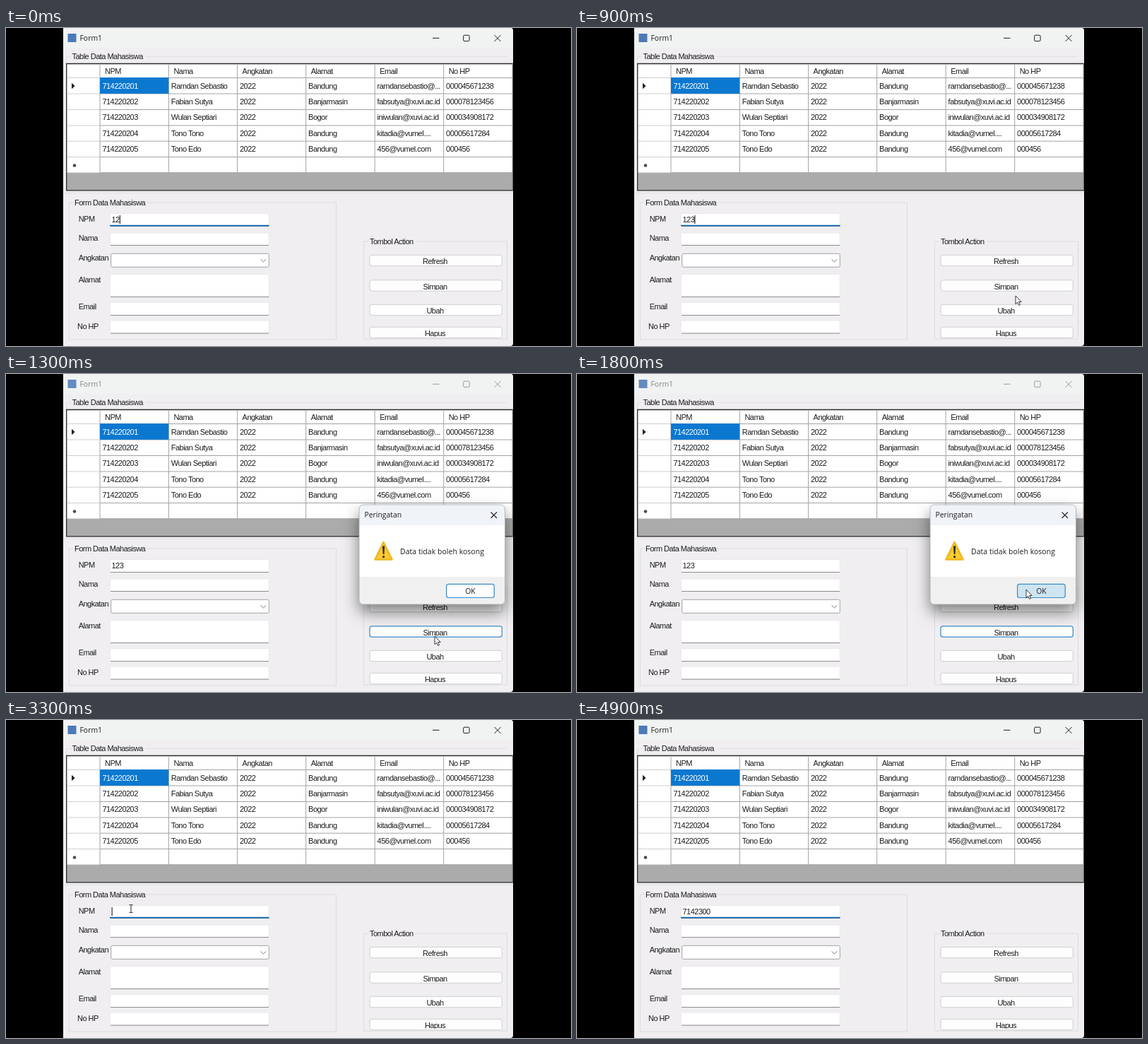
An HTML page that plays this animation: 800 px wide and 450 px high, repeating every 5000 ms.

```html
<!DOCTYPE html>
<html lang="id">
<head>
<meta charset="utf-8">
<title>Form1</title>
<style>
  html, body { margin: 0; width: 100%; height: 100%; overflow: hidden; background: #000; }
  svg { display: block; width: 100%; height: 100%; }
  text { font: 11px "Liberation Sans", Arial, sans-serif; letter-spacing: -.52px; fill: #1c1c1c; white-space: pre; }
  .ui { font: 10.4px "Open Sans", "Noto Sans", sans-serif; letter-spacing: 0; }
  .message { font-weight: 500; letter-spacing: .08px; }
  .mid { text-anchor: middle; }
</style>
</head>
<body>
<svg id="stage" viewBox="0 0 800 450">
  <defs>
    <filter id="shadow" x="-30%" y="-30%" width="160%" height="180%">
      <feDropShadow dx="0" dy="11" stdDeviation="11" flood-opacity=".5"/>
    </filter>
    <clipPath id="dialogClip"><rect x="500" y="185" width="206.5" height="141" rx="6"/></clipPath>
    <clipPath id="windowClip"><rect x="81" y="0" width="637" height="450" rx="4"/></clipPath>
  </defs>
</svg>
<script>
const LOOP = 5000;
const BLINK = 530;
const DIGIT = 5.6;
const ACCENT = '#3a8cc8';
const stage = document.getElementById('stage');

function add(tag, attrs, parent = stage) {
  const el = document.createElementNS('http://www.w3.org/2000/svg', tag);
  for (const key in attrs) el.setAttribute(key, attrs[key]);
  parent.appendChild(el);
  return el;
}
const rect = (x, y, width, height, fill, more, parent) =>
  add('rect', { x, y, width, height, fill, ...more }, parent);
const line = (d, stroke, width = 1, parent) =>
  add('path', { d, stroke, 'stroke-width': width, fill: 'none' }, parent);
function label(x, y, content, more, parent) {
  const el = add('text', { x, y, ...more }, parent);
  el.textContent = content;
  return el;
}
const show = (el, on) => el.setAttribute('visibility', on ? 'visible' : 'hidden');

// Window and title bar
add('path', { d: 'M81 0H714Q718 0 718 4V446Q718 450 714 450H81Z', fill: '#f0eef1' });
add('path', { d: 'M81 0H714Q718 0 718 4V28H81Z', fill: '#f0f3f2' });
const icon = rect(87.5, 8, 12, 12, '#4d79b8');
const title = label(104.5, 17.8, 'Form1', { class: 'ui' });
const controls = add('g', { fill: 'none' });
add('path', { d: 'M604 14.3H613.5M691.5 10L700.5 19M700.5 10L691.5 19' }, controls);
rect(647.7, 10.2, 8.4, 8.4, 'none', { rx: 1.4 }, controls);

// Data table
line('M92 40.5H85.5V50M198 40.5H709.5M82 233.5H718', '#e1e0e4');
label(93.5, 44.3, 'Table Data Mahasiswa');
rect(85, 50, 633, 180, '#ababab');
rect(86, 51, 631.5, 154, '#fff');
const colX = [133, 230.4, 327.6, 424.7, 522.2, 619.7, 717.2];
const rowY = [70.5, 93, 115.5, 138, 160.2, 182.5, 204.7];
colX.forEach(x => line(`M${x} 52V205`, '#a3a3a3'));
rowY.forEach(y => {
  line(`M87 ${y}H133`, '#cfcfcf');
  line(`M133 ${y}H717`, '#a3a3a3');
});
rect(133, 70, 97.2, 22.9, '#0b78d0');
line('M718 50.5H85.7V229.8H718', '#2b2b2b', 1.3);
line('M717.4 50V230', '#6c6c6c');
['NPM', 'Nama', 'Angkatan', 'Alamat', 'Email', 'No HP'].forEach((name, i) =>
  label(colX[i] + 7, 64.8, name));
const rows = [
  ['714220201', 'Ramdan Sebastio', '2022', 'Bandung', 'ramdansebastio@...', '000045671238'],
  ['714220202', 'Fabian Sutya', '2022', 'Banjarmasin', 'fabsutya@xuvi.ac.id', '000078123456'],
  ['714220203', 'Wulan Septiari', '2022', 'Bogor', 'iniwulan@xuvi.ac.id', '000034908172'],
  ['714220204', 'Tono Tono', '2022', 'Bandung', 'kitadia@vumel....', '00005617284'],
  ['714220205', 'Tono Edo', '2022', 'Bandung', '456@vumel.com', '000456']
];
rows.forEach((cells, r) => cells.forEach((cell, c) => {
  const el = label(colX[c] + 3.4, 85.6 + r * 22.4, cell);
  if (!r && !c) el.style.fill = '#fff';
}));
add('path', { d: 'M93 77.8L97.6 82L93 86.2Z', fill: '#222' });
add('circle', { cx: 97, cy: 194.5, r: 2.3, fill: '#4a4a4a' });

// Group boxes
function group(x, y, w, h, name, textX, textEnd) {
  line(`M${textX - 2} ${y}H${x}V${y + h}H${x + w}V${y}H${textEnd}`, '#dcdbdf');
  label(textX, y + 3.8, name);
}
group(89.5, 247, 378, 194, 'Form Data Mahasiswa', 97, 198);
group(506.5, 302, 203, 138, 'Tombol Action', 515, 581);

// Form fields
[['NPM', 274], ['Nama', 301], ['Angkatan', 329.3], ['Alamat', 360], ['Email', 398.3], ['No HP', 426.3]]
  .forEach(([name, y], i) => label(i === 5 ? 101 : 102.7, y, name));
const boxes = [[262.5, 18], [290, 17.5], [348.5, 32], [388.5, 18], [414, 18]];
boxes.forEach(([y, h]) => {
  rect(147.3, y, 225, h, '#fff', { stroke: '#e6e5e8', 'stroke-width': .8, rx: 1.5 });
  line(`M148 ${y + h}H372`, '#8c8c8e');
});
rect(148.7, 319.3, 223.6, 19, '#fff', { stroke: '#a2a2a4', rx: 2 });
line('M360.5 327.3L364.4 331L368.3 327.3', '#777');
const focusLine = line('M147 279.7H372.6', '#1068b5', 1.8);
const entry = label(149.5, 275, '');
const caret = rect(0, 265, 1, 12, '#000');

// Action buttons
const buttons = [['Refresh', 321.3, 333.8], ['Simpan', 356.8, 369.6], ['Ubah', 391.3, 404], ['Hapus', 423.2, 436]]
  .map(([name, y, base], i) => {
    const face = rect(515, y, 187.3, 15.4, '#fdfdfd', { rx: 3, stroke: '#cfced2' });
    const clip = add('clipPath', { id: 'face' + i });
    rect(515, y, 188, 13.6, '#000', {}, clip);
    label(607.5, base, name, { class: 'mid', 'clip-path': `url(#face${i})` });
    return face;
  });

// Warning dialog
const dialog = add('g', {});
const backdrop = add('g', { 'clip-path': 'url(#windowClip)' }, dialog);
rect(500, 185, 206.5, 141, '#fff', { rx: 6, filter: 'url(#shadow)' }, backdrop);
const panel = add('g', { 'clip-path': 'url(#dialogClip)' }, dialog);
rect(500, 185, 207, 29, '#f0f4f8', {}, panel);
rect(500, 287, 207, 40, '#f0f0f0', {}, panel);
rect(500, 185, 206.5, 141, 'none', { rx: 6, stroke: '#a8a8aa', 'stroke-width': .8 }, dialog);
label(507.5, 203.3, 'Peringatan', { class: 'ui' }, dialog);
line('M686.5 195.5L695 204M695 195.5L686.5 204', '#222', 1.1, dialog);
add('path', {
  d: 'M534.5 238L546.5 262.5H522.5Z', fill: '#fbcb2f', stroke: '#efb722',
  'stroke-width': 2.6, 'stroke-linejoin': 'round'
}, dialog);
add('path', { d: 'M533 243.5H536.2L535.5 255H533.7Z', fill: '#2b2b2b' }, dialog);
add('circle', { cx: 534.6, cy: 258.7, r: 1.6, fill: '#2b2b2b' }, dialog);
label(558, 255, 'Data tidak boleh kosong', { class: 'ui message' }, dialog);
const ok = rect(623.6, 297.3, 67.7, 19.2, '#fdfdfd', { rx: 3, stroke: ACCENT, 'stroke-width': 1.2 }, dialog);
label(657.4, 311, 'OK', { class: 'ui mid' }, dialog);

// Mouse pointers, both with their hot spot at 0,0
const arrow = add('path', {
  d: 'M0 0V11.6L2.7 9.2L4.6 13.4L6.5 12.5L4.7 8.5H8.2Z', fill: '#fff', stroke: '#222', 'stroke-width': .9
});
const beam = line('M-2.5 -5.5H-.7L0 -5L.7 -5.5H2.5M0 -5V5M-2.5 5.5H-.7L0 5L.7 5.5H2.5', '#222');

// time, x, y
const path = [
  [500, 180, 272], [900, 621, 379], [1150, 607, 371], [1350, 607, 371],
  [1700, 636, 305], [1900, 636, 305], [2250, 177, 267], [LOOP, 177, 267]
];
const ease = p => p * p * (3 - 2 * p);
function pointerAt(t) {
  const i = Math.max(1, path.findIndex(p => p[0] > t));
  const [t0, x0, y0] = path[i - 1];
  const [t1, x1, y1] = path[i];
  const p = ease(Math.max(0, (t - t0) / (t1 - t0)));
  return [x0 + (x1 - x0) * p, y0 + (y1 - y0) * p];
}

// Each keystroke: time and resulting text
const number = '7142300';
const keys = [[0, '12'], [400, '123'], [2400, '123'], [2600, '12'], [2750, '1'], [2900, '']];
for (let i = 1; i <= number.length; i++) keys.push([3360 + i * 140, number.slice(0, i)]);

function draw(t) {
  const [keyTime, value] = keys.filter(k => k[0] <= t).pop();
  const open = t >= 1300 && t < 1900;
  const buttonFocus = t >= 1200 && t < 2400;
  const typing = t < 500 || t >= 3500;
  const [x, y] = pointerAt(t);

  entry.textContent = value;
  caret.setAttribute('x', 149.6 + value.length * DIGIT);
  show(caret, !buttonFocus && (t - keyTime) % (2 * BLINK) < BLINK);
  show(focusLine, !buttonFocus);
  buttons[1].setAttribute('stroke', buttonFocus ? ACCENT : '#cfced2');
  buttons[1].setAttribute('stroke-width', buttonFocus ? 1.2 : 1);

  show(dialog, open);
  title.style.fill = open ? '#858585' : '#1c1c1c';
  icon.setAttribute('opacity', open ? .85 : 1);
  controls.setAttribute('stroke', open ? '#9a9a9a' : '#1c1c1c');
  const overOk = x > 623 && x < 691 && y > 297 && y < 317;
  ok.setAttribute('fill', overOk ? '#cfe4f2' : '#fdfdfd');

  const overText = x > 147 && x < 372 && boxes.some(([top, h]) => y > top && y < top + h);
  for (const el of [arrow, beam]) {
    el.setAttribute('transform', `translate(${x} ${y})`);
    show(el, !typing && (el === beam) === overText);
  }
}

const start = performance.now();
function tick() {
  draw((performance.now() - start) % LOOP);
  requestAnimationFrame(tick);
}
tick();
</script>
</body>
</html>
```
